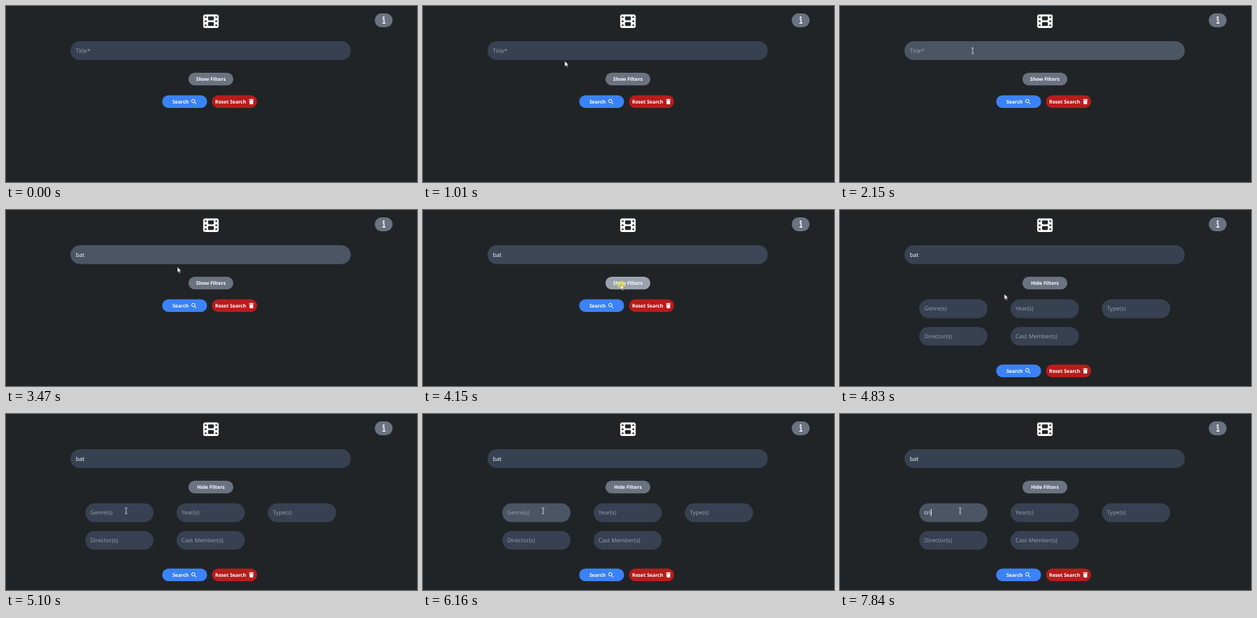
Write an HTML page that moves like this. It is 561 px wide and 240 px high and loops after 8 s.

```html
<!DOCTYPE html>
<html lang="en">
<head>
<meta charset="utf-8">
<title>Film search</title>
<style>
html, body { margin: 0; width: 100%; height: 100%; overflow: hidden; background: #212426; }
svg { display: block; width: 561px; height: 240px; }
text { font: 7.8px "Open Sans", "Noto Sans", sans-serif; fill: #fff; text-rendering: geometricPrecision; white-space: pre; }
.hint { fill: #9ca3af; }
.label { font-size: 6.65px; font-weight: 700; }
.mid { text-anchor: middle; }
.field { fill: #374151; }
.gray { fill: #6b7280; }
</style>
</head>
<body>
<svg viewBox="0 0 561 240">
  <defs>
    <g id="bin" fill="#fff">
      <path d="M0 .6H1.8L2.2 0H4.2L4.6 .6H6.4V1.5H0Z"/>
      <path d="M.5 2H5.9L5.5 6.7Q5.4 7.4 4.8 7.4H1.6Q1 7.4 .9 6.7Z"/>
    </g>
  </defs>

  <g transform="translate(269.2 10.2) scale(.0412)">
    <rect y="32" width="512" height="448" rx="64" fill="#fff"/>
    <g id="holes" fill="#212426"></g>
  </g>

  <rect class="gray" x="503.3" y="10" width="24.4" height="19" rx="9.5"/>
  <circle cx="515.5" cy="15.5" r="1.2" fill="#fff"/>
  <path d="M514 18.2H516V23.2M513.6 23.4H518" fill="none" stroke="#fff" stroke-width="1.3"/>

  <rect id="title" class="field" x="88" y="48" width="382.6" height="25.8" rx="12.9"/>
  <text id="titleHint" class="hint" x="95.3" y="63.6">Title*</text>
  <text id="titleText" x="95.3" y="63.6"></text>
  <rect id="titleCaret" x="95.3" y="56.3" width=".8" height="9.6" fill="#fff"/>

  <rect id="toggle" class="gray" x="249" y="91" width="61.3" height="17.3" rx="8.65"/>
  <text id="showLabel" class="label mid" x="279.6" y="102.1">Show Filters</text>
  <text id="hideLabel" class="label mid" x="279.6" y="102.1">Hide Filters</text>

  <g id="filters"></g>
  <text id="genreText" x="115" y="137.2"></text>
  <rect id="genreCaret" x="115" y="129.6" width=".8" height="9.6" fill="#fff"/>

  <g id="actions">
    <rect x="213.2" y="121.8" width="61.3" height="17.2" rx="8.6" fill="#3b82f6"/>
    <text class="label" x="227.2" y="132.9">Search</text>
    <path d="M258 129.6A2.3 2.3 0 1 1 253.4 129.6A2.3 2.3 0 1 1 258 129.6M257.4 131.4L260 134" fill="none" stroke="#fff" stroke-width="1"/>
    <rect x="281.2" y="121.8" width="61.5" height="17.2" rx="8.6" fill="#b91c1c"/>
    <text class="label" x="285.5" y="132.9">Reset Search</text>
    <use href="#bin" x="331.7" y="126.7"/>
  </g>

  <g id="pointer">
    <circle id="click" r="5.2" cx=".8" cy=".8" fill="#e6e04a" opacity=".75"/>
    <path id="arrow" d="M0 0V7.4L1.7 5.9L2.9 8.6L4.1 8.1L2.9 5.4H5.2Z" fill="#fff" stroke="#222" stroke-width=".4"/>
    <path id="beam" d="M-1.6 -4H-.5L0 -3.5L.5 -4H1.6M0 -3.5V3.5M-1.6 4H-.5L0 3.5L.5 4H1.6" fill="none" stroke="#eee" stroke-width=".8"/>
  </g>
</svg>
<script>
const LOOP = 8000;
const SVG = 'http://www.w3.org/2000/svg';
const $ = id => document.getElementById(id);

function add(parent, tag, attrs, text = '') {
  const el = document.createElementNS(SVG, tag);
  for (const key in attrs) el.setAttribute(key, attrs[key]);
  el.textContent = text;
  parent.append(el);
  return el;
}

// steps: [time, value] pairs; held until the next pair unless easing says otherwise
function play(el, prop, steps, easing = 'steps(1, end)') {
  const all = [...steps, [LOOP, steps[steps.length - 1][1]]];
  if (all[0][0] > 0) all.unshift([0, all[0][1]]);
  const keys = all.map(([time, value]) => ({ offset: time / LOOP, [prop]: value, easing }));
  el.animate(keys, { duration: LOOP, iterations: Infinity });
}

// times at which visibility flips, starting from hidden
function show(el, ...flips) {
  const steps = flips.map((time, i) => [time, i % 2 ? 'hidden' : 'visible']);
  play(el, 'visibility', [[0, 'hidden'], ...steps]);
}

const move = (x, y) => `translate(${x}px, ${y}px)`;

function type(el, text, times) {
  [...text].forEach((ch, i) => show(add(el, 'tspan', {}, ch), times[i]));
}

function caret(el, times, shifts) {
  play(el, 'transform', [[0, move(0, 0)], ...times.map((time, i) => [time, move(shifts[i], 0)])]);
}

function glide(start, end, count, from, to, ease) {
  return Array.from({ length: count }, (_, i) => {
    const u = i / (count - 1), k = ease(u);
    return [start + (end - start) * u, from[0] + (to[0] - from[0]) * k, from[1] + (to[1] - from[1]) * k];
  });
}

// film strip holes
for (const y of [96, 232, 368])
  for (const x of [48, 400]) add($('holes'), 'rect', { x, y, width: 64, height: 48, rx: 14 });
for (const y of [96, 288]) add($('holes'), 'rect', { x: 160, y, width: 192, height: 128, rx: 26 });

// filter fields
const fields = ['Genre(s)', 'Year(s)', 'Type(s)', 'Director(s)', 'Cast Member(s)'].map((name, i) => {
  const x = 108.2 + i % 3 * 124.6, y = 121.8 + (i > 2 ? 37.6 : 0);
  const box = add($('filters'), 'rect', { class: 'field', x, y, width: 93.2, height: 25.6, rx: 12.8 });
  const hint = add($('filters'), 'text', { class: 'hint', x: x + 6.8, y: y + 15.4 }, name);
  return { box, hint };
});
const genre = fields[0];

// title field
const idle = '#374151', focus = '#4b5563';
play($('title'), 'fill', [[1540, idle], [1750, focus], [4010, focus], [4200, idle]], 'linear');
show($('titleHint'), 0, 2620);
type($('titleText'), 'bat', [2620, 2720, 2810]);
caret($('titleCaret'), [2620, 2720, 2810], [4.8, 9.1, 11.9]);
show($('titleCaret'), 1610, 2150, 2620, 3340, 3880, 4010);

// filter toggle
const rest = '#6b7280', hover = '#9ca3af';
play($('toggle'), 'fill', [[3600, rest], [3750, hover], [4640, hover], [4790, rest]], 'linear');
show($('showLabel'), 0, 4220);
show($('hideLabel'), 4220);
for (const { box } of fields) show(box, 4220);
for (const { hint } of fields.slice(1)) show(hint, 4220);
play($('actions'), 'transform', [[0, move(0, 0)], [4220, move(0, 89)]]);

// genre field
play(genre.box, 'fill', [[5630, idle], [5830, focus]], 'linear');
show(genre.hint, 4220, 7380);
type($('genreText'), 'cri', [7380, 7640, 7840]);
caret($('genreCaret'), [7380, 7640, 7840], [3.7, 6.9, 9]);
show($('genreCaret'), 5630, 6160, 6700, 7240, 7380);

// pointer
const easeOut = u => 1 - (1 - u) ** 2;
const easeInOut = u => .06 + .94 * u * u * (3 - 2 * u);
const path = [
  ...glide(580, 1140, 8, [334, 231], [181, 61], easeOut),
  [3340, 195, 64], [3410, 216, 70], [3470, 234, 77.6], [3540, 247, 86],
  [3620, 257, 92], [3690, 264, 97], [3760, 268, 100], [3820, 269.7, 101.2],
  ...glide(4570, 5100, 8, [269.7, 101.2], [164, 132], easeInOut)
];
play($('pointer'), 'transform', path.map(([time, x, y]) => [time, move(x, y)]));
const overField = ([, x, y]) => y < 74 || (y > 122 && x < 201 && x > 108);
const shape = test => [[0, 'hidden'], ...path.map(p => [p[0], test(p) ? 'visible' : 'hidden'])];
play($('beam'), 'visibility', shape(overField));
play($('arrow'), 'visibility', shape(p => !overField(p)));
show($('click'), 1540, 1750, 4080, 4220, 5630, 5830);
</script>
</body>
</html>
```
